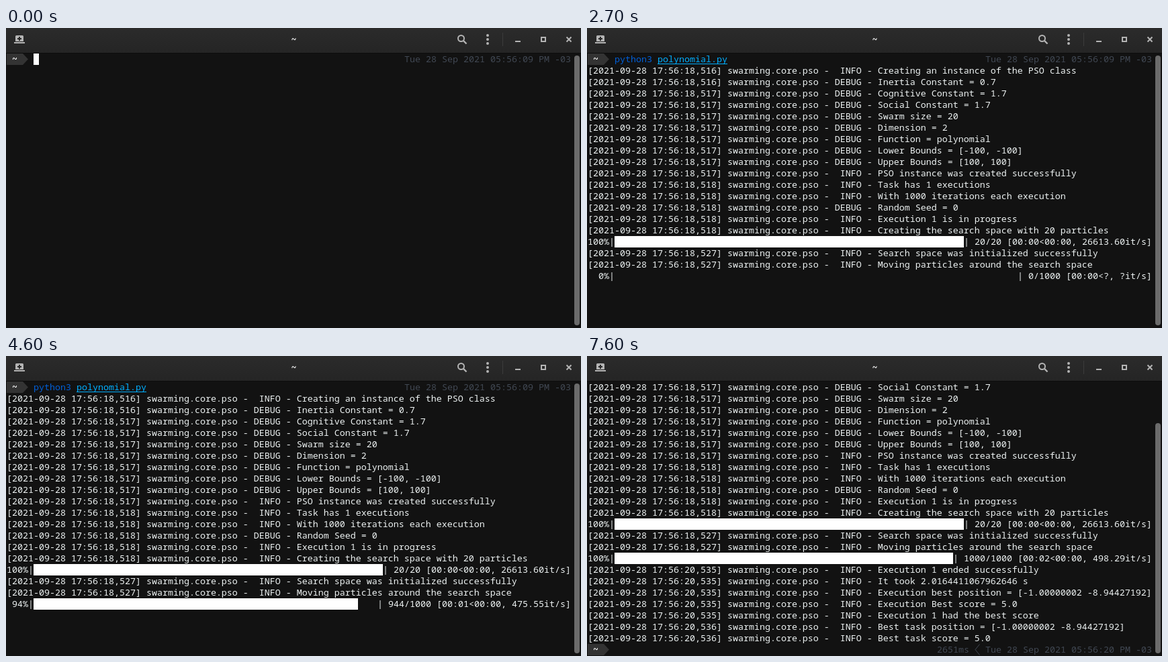
Write an HTML page that moves like this. It is 856 px wide and 447 px high and loops after 8 s.

```html
<!DOCTYPE html>
<html lang="en">
<head>
<meta charset="utf-8">
<title>Terminal</title>
<style>
  html, body { margin: 0; width: 100%; height: 100%; overflow: hidden; background: #121212; }
  svg { display: block; }
  text { font: 13.3333px "Noto Sans Mono", "DejaVu Sans Mono", monospace; white-space: pre; }
  .bold { font-weight: 700; }
</style>
</head>
<body>
<svg width="856" height="447" viewBox="0 0 856 447">
  <defs>
    <linearGradient id="header" x2="0" y2="1">
      <stop stop-color="#2b2b2b"/><stop offset="1" stop-color="#252525"/>
    </linearGradient>
  </defs>
  <rect width="856" height="447" fill="#121212"/>
  <rect width="856" height="37" fill="url(#header)"/>
  <rect y="37" width="856" height="1" fill="#0c0c0c"/>
  <text class="bold" x="428.5" y="21.5" text-anchor="middle" fill="#fff">~</text>
  <g fill="#b4b4b4">
    <path d="M14 20V12.500Q14 11 15.500 11H24.500Q26 11 26 12.500V20ZM12 21H28V23H12Z"/>
    <path d="M19 13h2v2h2v2h-2v2h-2v-2h-2v-2h2Z" fill="#282828"/>
    <circle cx="717" cy="11" r="2"/><circle cx="717" cy="17" r="2"/><circle cx="717" cy="23" r="2"/>
    <rect x="758" y="19" width="8" height="2"/>
  </g>
  <g fill="none" stroke="#b4b4b4" stroke-width="2">
    <circle cx="677.500" cy="15.500" r="4.500"/>
    <path d="M681 19L685.500 23.500" stroke-width="2.400"/>
    <rect x="797" y="14" width="6" height="6"/>
    <path d="M834.500 13.500L841.500 20.500M841.500 13.500L834.500 20.500"/>
  </g>
  <rect x="739" y="7" width="1" height="20" fill="#3c3c3c"/>
  <g id="screen"></g>
</svg>
<script>
const LOOP = 8000, CELL = 8, LINE = 17, LEFT = 1, TOP = 38, COLS = 105;
const BACK = '#121212', FORE = '#eef3f3', DIM = '#414853';
const COMMAND = 'python3 polynomial.py';
const screen = document.getElementById('screen');

const colX = col => LEFT + col * CELL;
const rowY = row => TOP + row * LINE;
const escapeText = s => s.replace(/&/g, '&amp;').replace(/</g, '&lt;');
const put = (col, row, s, fill = FORE, cls = '') =>
  `<text class="${cls}" x="${colX(col)}" y="${rowY(row) + 13}" fill="${fill}">${escapeText(s)}</text>`;
const box = (x, y, w, h, fill, rx = 0) =>
  `<rect x="${x}" y="${y}" width="${w}" height="${h}" rx="${rx}" fill="${fill}"/>`;
const cursor = (col, row) => box(colX(col), rowY(row), CELL, LINE, '#fff');
const scrollbar = top => box(846, top, 8, 443 - top, '#6b6b6b', 4);

function prompt(row, time) {
  const y = rowY(row);
  return `<path d="M1 ${y}H25L33 ${y + 8.5}L25 ${y + 17}H1Z" fill="#333"/>`
    + put(1, row, '~', '#fff', 'bold')
    + put(74, row, `Tue 28 Sep 2021 ${time} PM -03`, DIM);
}

// Cursor column and highlighted length while the command is typed: [start, cursor, typed]
const typing = [[0, 0, 0], [300, 1, 1], [600, 2, 4], [800, 4, 6], [1000, 5, 6]];

function commandLine(t) {
  if (t >= 1600) {
    return put(5, 0, 'python3', '#005fd7') + put(13, 0, 'polynomial.py', '#00afff')
      + box(colX(13), rowY(0) + 15, 13 * CELL, 1, '#00afff')
      + (t < 2100 ? cursor(26, 0) : '');
  }
  const [start, at, typed] = typing.filter(k => t >= k[0]).pop();
  if (!start) return cursor(5, 0);
  return put(5, 0, COMMAND.slice(0, typed), '#f00')
    + put(5 + typed, 0, COMMAND.slice(typed), '#555')
    + cursor(5 + at, 0) + put(5 + at, 0, COMMAND[at], BACK);
}

// Each entry: milliseconds of the stamp, level, message
const setup = [
  [516, 'INFO', 'Creating an instance of the PSO class'],
  [516, 'DEBUG', 'Inertia Constant = 0.7'],
  [517, 'DEBUG', 'Cognitive Constant = 1.7'],
  [517, 'DEBUG', 'Social Constant = 1.7'],
  [517, 'DEBUG', 'Swarm size = 20'],
  [517, 'DEBUG', 'Dimension = 2'],
  [517, 'DEBUG', 'Function = polynomial'],
  [517, 'DEBUG', 'Lower Bounds = [-100, -100]'],
  [517, 'DEBUG', 'Upper Bounds = [100, 100]'],
  [517, 'INFO', 'PSO instance was created successfully'],
  [518, 'INFO', 'Task has 1 executions'],
  [518, 'INFO', 'With 1000 iterations each execution'],
  [518, 'DEBUG', 'Random Seed = 0'],
  [518, 'INFO', 'Execution 1 is in progress'],
  [518, 'INFO', 'Creating the search space with 20 particles']
];
const moving = [
  [527, 'INFO', 'Search space was initialized successfully'],
  [527, 'INFO', 'Moving particles around the search space']
];
const results = [
  [535, 'INFO', 'Execution 1 ended successfully'],
  [535, 'INFO', 'It took 2.0164411067962646 s'],
  [535, 'INFO', 'Execution best position = [-1.00000002 -8.94427192]'],
  [535, 'INFO', 'Execution Best score = 5.0'],
  [535, 'INFO', 'Execution 1 had the best score'],
  [536, 'INFO', 'Best task position = [-1.00000002 -8.94427192]'],
  [536, 'INFO', 'Best task score = 5.0']
];

const log = (entries, first, second = 18) => entries.map(([ms, level, message], i) =>
  first + i < 0 ? '' : put(0, first + i,
    `[2021-09-28 17:56:${second},${ms}] swarming.core.pso - ${level.padStart(5)} - ${message}`)).join('');

function progress(row, n, total, timing) {
  const tail = `| ${n}/${total} [${timing}it/s]`;
  const end = COLS - tail.length, part = n / total;
  const percent = String(Math.floor(part * 100)).padStart(3);
  return put(0, row, percent + '%|') + put(end, row, tail)
    + box(colX(5), rowY(row), Math.floor((end - 5) * CELL * part), LINE, '#fff');
}

// Refresh times of the second bar and the speed shown at each
const refreshes = [
  [2800, 512.37], [2900, 508.94], [3100, 503.18], [3200, 506.72],
  [3300, 511.06], [3400, 515.83], [3500, 509.41], [3600, 514.29],
  [3700, 520.65], [3800, 526.48], [3900, 519.74], [4000, 508.32],
  [4200, 496.87], [4300, 489.15], [4400, 481.63], [4600, 475.55]
];

function iterations(row, t) {
  if (t >= 4700) return progress(row, 1000, 1000, '00:02<00:00, 498.29');
  const step = refreshes.filter(r => t >= r[0]).length;
  if (!step) return progress(row, 0, 1000, '00:00<?, ?');
  const n = Math.round(step <= 10 ? step * 54.2 : 542 + (step - 10) * 67);
  const speed = refreshes[step - 1][1];
  const elapsed = t >= 3800 ? 1 : 0, left = Math.floor((1000 - n) / speed);
  return progress(row, n, 1000, `00:0${elapsed}<00:0${left}, ${speed.toFixed(2)}`);
}

function output(t, first) {
  return log(setup, first) + progress(first + 15, 20, 20, '00:00<00:00, 26613.60')
    + log(moving, first + 16) + iterations(first + 18, t);
}

function lastRow(t) {
  if (t < 4900) return cursor(0, 23);
  const blinks = [5300, 5800, 6400, 7000, 7600].filter(time => t >= time).length;
  return prompt(23, '05:56:20') + put(65, 23, '2651ms', DIM)
    + `<path d="M584.5 429.500L578 437.500L584.5 445.500" fill="none" stroke="${DIM}"/>`
    + (blinks % 2 ? '' : cursor(5, 23));
}

function draw(t) {
  if (t >= 4700) {
    return scrollbar(100) + output(t, -3) + log(results, 16, 20) + lastRow(t);
  }
  let picture = scrollbar(41) + prompt(0, '05:56:09') + commandLine(t);
  if (t >= 2700) picture += output(t, 1);
  else if (t >= 2100) picture += cursor(0, 1);
  return picture;
}

const begin = performance.now();
let shown = '';
function update() {
  const picture = draw((performance.now() - begin) % LOOP);
  if (picture !== shown) screen.innerHTML = shown = picture;
  requestAnimationFrame(update);
}
update();
</script>
</body>
</html>
```
